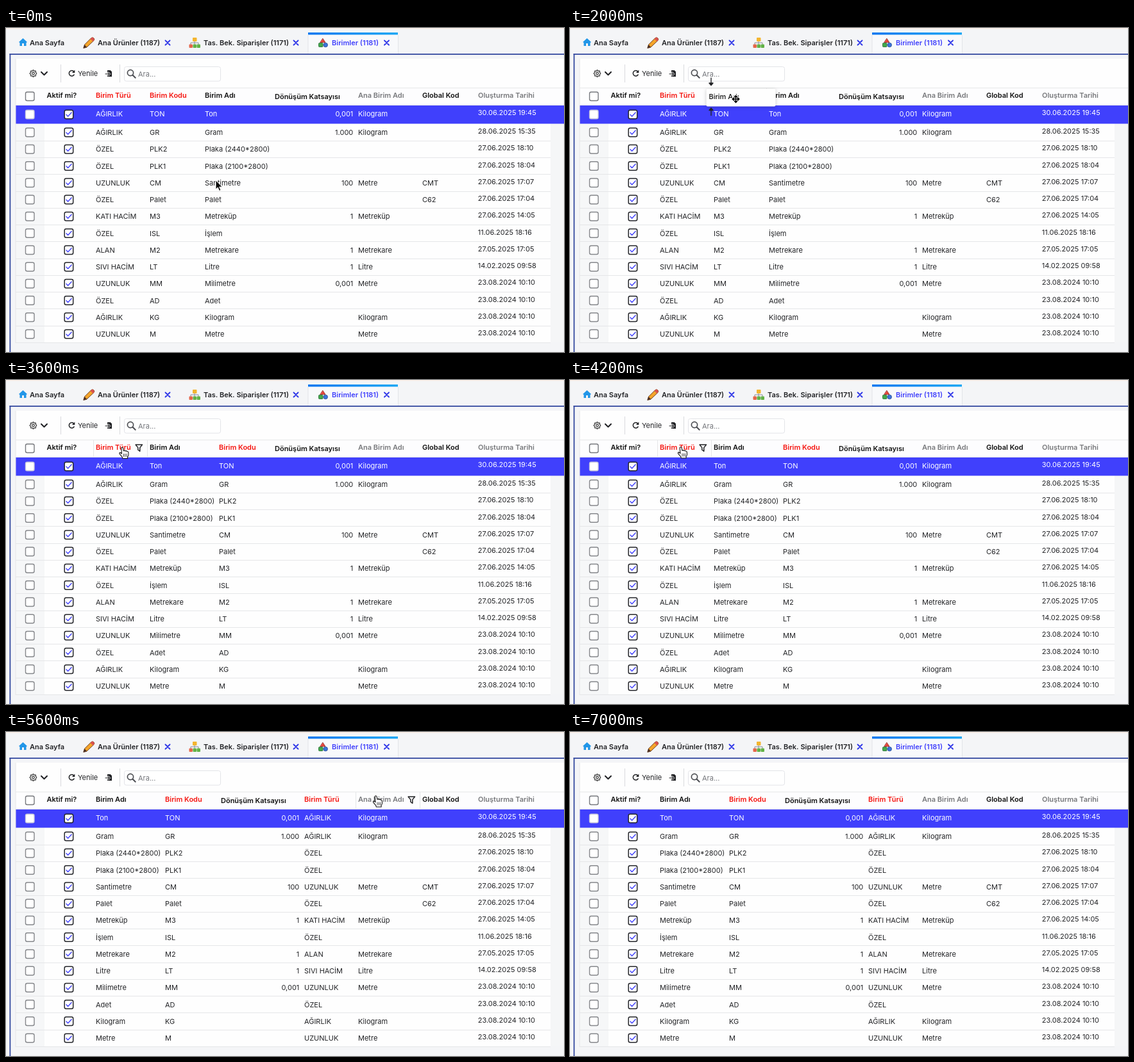
Recreate the animation shown at these times as an HTML page with a canvas. Size 870x506 px, loop 7.2 s.

```html
<!DOCTYPE html>
<html lang="tr">
<head>
<meta charset="utf-8">
<title>Birimler</title>
<style>
html, body { margin: 0; width: 100%; height: 100%; overflow: hidden; background: #f4f5f7; }
canvas { display: block; width: 870px; height: 506px; }
</style>
</head>
<body>
<canvas id="stage"></canvas>
<script>
const W = 870, H = 506, LOOP = 7200, STEP = 200;
const BLUE = '#4040fc', INK = '#222326', RED = '#f5140f', GREY = '#77787b', LINE = '#e5e6e8';
const HEAD_TOP = 94, HEAD_END = 121, BODY_END = 491;

const canvas = document.getElementById('stage');
const dpr = window.devicePixelRatio || 1;
canvas.width = W * dpr;
canvas.height = H * dpr;
const c = canvas.getContext('2d');

// type | code | name | factor | base unit | global code | created
const rows = `AĞIRLIK|TON|Ton|0,001|Kilogram||30.06.2025 19:45
AĞIRLIK|GR|Gram|1.000|Kilogram||28.06.2025 15:35
ÖZEL|PLK2|Plaka (2440*2800)||||27.06.2025 18:10
ÖZEL|PLK1|Plaka (2100*2800)||||27.06.2025 18:04
UZUNLUK|CM|Santimetre|100|Metre|CMT|27.06.2025 17:07
ÖZEL|Palet|Palet|||C62|27.06.2025 17:04
KATI HACİM|M3|Metreküp|1|Metreküp||27.06.2025 14:05
ÖZEL|ISL|İşlem||||11.06.2025 18:16
ALAN|M2|Metrekare|1|Metrekare||27.05.2025 17:05
SIVI HACİM|LT|Litre|1|Litre||14.02.2025 09:58
UZUNLUK|MM|Milimetre|0,001|Metre||23.08.2024 10:10
ÖZEL|AD|Adet||||23.08.2024 10:10
AĞIRLIK|KG|Kilogram||Kilogram||23.08.2024 10:10
UZUNLUK|M|Metre||Metre||23.08.2024 10:10`.split('\n').map(r => r.split('|'));

const cols = [
  { title: 'Birim Türü', w: 84, color: RED },
  { title: 'Birim Kodu', w: 86, color: RED },
  { title: 'Birim Adı', w: 108 },
  { title: 'Dönüşüm Katsayısı', w: 131, right: true, pad: 5, drop: 2.5 },
  { title: 'Ana Birim Adı', w: 100, color: GREY },
  { title: 'Global Kod', w: 87 },
  { title: 'Oluşturma Tarihi', w: 116, color: GREY, lift: 2 }
];

const orders = [
  { from: 0, ids: [0, 1, 2, 3, 4, 5, 6] },
  { from: 2400, ids: [0, 2, 1, 3, 4, 5, 6] },
  { from: 5600, ids: [2, 1, 3, 0, 4, 5, 6] }
];

const drags = [
  { col: 2, from: 1400, to: 2400, dx: 46, dy: 16 },
  { col: 0, from: 4400, to: 5600, dx: 39, dy: 13 }
];

// pointer path: time, x, y
const path = [
  [0, 327, 238], [200, 327, 238], [1000, 352, 110], [1400, 352, 110],
  [2000, 258.5, 111], [2200, 250, 111], [2800, 242, 108], [3400, 190, 106],
  [3800, 173, 105], [4200, 173, 105], [4400, 176, 106], [5000, 577, 100],
  [5600, 577, 100], [6200, 576, 99.5], [6400, 576, 99.5], [6800, 620, 540], [7200, 620, 540]
];

function pointerAt(t) {
  const i = path.findIndex(p => p[0] > t);
  const a = path[i - 1], b = path[i];
  let k = (t - a[0]) / (b[0] - a[0]);
  k = k * k * (3 - 2 * k);
  return { x: a[1] + (b[1] - a[1]) * k, y: a[2] + (b[2] - a[2]) * k };
}

function rect(x, y, w, h, color) {
  c.fillStyle = color;
  c.fillRect(x, y, w, h);
}

function box(x, y, w, h, r, fill, stroke, lw = 1) {
  c.beginPath();
  c.roundRect(x, y, w, h, r);
  if (fill) { c.fillStyle = fill; c.fill(); }
  if (stroke) { c.strokeStyle = stroke; c.lineWidth = lw; c.stroke(); }
}

// y is the middle of the capitals
function text(s, x, y, color = INK, weight = 400, align = 'left') {
  c.font = `${weight} 11px Inter, sans-serif`;
  c.textAlign = align;
  c.fillStyle = color;
  c.fillText(s, x, y + 4);
}

function shape(d, x, y, fill, stroke, lw = 1) {
  c.save();
  c.translate(x, y);
  c.lineJoin = c.lineCap = 'round';
  const p = new Path2D(d);
  if (fill) { c.fillStyle = fill; c.fill(p); }
  if (stroke) { c.strokeStyle = stroke; c.lineWidth = lw; c.stroke(p); }
  c.restore();
}

function disc(x, y, r, fill, stroke, lw) {
  c.beginPath();
  c.arc(x, y, r, 0, 7);
  if (fill) { c.fillStyle = fill; c.fill(); }
  if (stroke) { c.strokeStyle = stroke; c.lineWidth = lw; c.stroke(); }
}

function closeMark(x) {
  shape('M-3.5-3.5L3.5 3.5M3.5-3.5L-3.5 3.5', x, 23, null, '#3038e8', 1.9);
}

function drawTabs() {
  rect(0, 0, W, 1.5, '#fcefe8');
  shape('M-6.5 0L0-6L6.5 0L5 1V6H1.5V2H-1.5V6H-5V1Z', 26.5, 22, '#2196e8');
  text('Ana Sayfa', 37, 23, INK, 600);

  shape('M-8 8L-6.5 3L4-7.5Q6-9 8-7Q9.5-5 8-3.5L-3 7Z', 129, 23, '#f5a52a', '#6b3d20', 1);
  shape('M4-7.5Q6-9 8-7Q9.5-5 8-3.5L6.5-2L2.5-6Z', 129, 23, '#d9534f');
  shape('M-8.5 8.5L-6.5 3L-3 7Z', 129, 23, '#4a3024');
  text('Ana Ürünler (1187)', 143, 23, INK, 600);
  closeMark(252);

  shape('M0-4V4M-6 4V0H6V4', 294, 23, null, '#8b8f96', 1);
  box(291, 15, 6.5, 6, 1, '#f3b52f');
  box(285.5, 25.5, 5.5, 5.5, 1, '#e5674b');
  box(291.5, 25.5, 5.5, 5.5, 1, '#62b246');
  box(297.5, 25.5, 5.5, 5.5, 1, '#62b246');
  text('Tas. Bek. Siparişler (1171)', 308, 23, INK, 600);
  closeMark(452);

  rect(471, 8, 140, 33, '#f8f9fb');
  rect(470.5, 11, 1, 29, '#e2e4e8');
  rect(611, 11, 1, 29, '#e2e4e8');
  const g = c.createLinearGradient(471, 0, 611, 0);
  g.addColorStop(0, '#0a78f0');
  g.addColorStop(1, '#20a8f4');
  rect(471, 7, 140, 3.5, g);
  shape('M0-6L4 0H-4Z', 494, 22.5, '#e8473c', '#8e2a28', 0.8);
  box(487.5, 23.5, 6.5, 6, 1, '#42a84b', '#256d35', 0.8);
  disc(498.2, 26.5, 3.3, '#3b74d8', '#294b92', 0.8);
  text('Birimler (1181)', 508, 23, BLUE, 600);
  closeMark(593.5);
}

function drawGear(x, y) {
  c.save();
  c.translate(x, y);
  c.beginPath();
  for (let i = 0; i <= 48; i++) {
    const a = i / 48 * Math.PI * 2;
    const r = 4.7 + 0.7 * Math.cos(a * 8);
    c.lineTo(r * Math.cos(a), r * Math.sin(a));
  }
  c.strokeStyle = '#333';
  c.lineWidth = 1.2;
  c.stroke();
  disc(0, 0, 1.8, null, '#333', 1.2);
  c.restore();
}

function drawToolbar() {
  rect(15, 48, W - 15, 46, '#fefefe');
  drawGear(42.5, 71);
  shape('M-4.5-2.3L0 2.3L4.5-2.3', 59.5, 71, null, INK, 2);
  rect(85, 57, 1, 28, '#d9dadd');
  shape('M3.6 2A4.2 4.2 0 1 1 3-3.2', 102.5, 71, null, INK, 1.5);
  shape('M4.8-5.5V-1H.4Z', 102.5, 71, INK);
  text('Yenile', 112, 71);
  shape('M-2.5-5H2.2L4.5-2.7V5H-2.5Z', 160.5, 71, INK);
  shape('M-5 .8H1M-1-1.4L1.2.8L-1 3', 160.5, 71, null, '#fff', 2.4);
  shape('M-5.5 .8H1M-1-1.4L1.2.8L-1 3', 160.5, 71, null, INK, 1.1);
  rect(177, 57, 1, 28, '#d9dadd');
  box(184.5, 60.5, 150, 22.5, 3, '#fff', '#e3e4e8');
  disc(194, 70, 4.6, null, '#4b4d52', 1.7);
  shape('M0 0L4.2 4.2', 197.5, 73.5, null, '#4b4d52', 2);
  text('Ara...', 206, 71.5, '#74767b');
}

function layout(t) {
  let x = 136;
  const order = orders.filter(o => o.from <= t).pop();
  return order.ids.map(id => {
    const item = { id, x, w: cols[id].w };
    x += item.w;
    return item;
  });
}

function drawFilter(x, y) {
  shape('M-5.2-5H5.2L1.5-.4V5.3L-1.5 3V-.4Z', x, y, null, INK, 1.5);
}

function drawHeader(places, hover) {
  rect(15, HEAD_TOP, W - 15, 27, '#fdfdfe');
  rect(15, 93.2, W - 15, 1, LINE);
  rect(15, 120.2, W - 15, 1, LINE);
  box(30.5, 100, 13.5, 13.5, 2.5, '#fff', '#77797e', 1.4);
  text('Aktif mi?', 63.5, 104.5, '#111', 600);
  for (const p of places) {
    const col = cols[p.id];
    text(col.title, p.x + (col.pad || 4), 104.5 + (col.drop || 0), col.color || '#111', 600);
  }
  if (hover) {
    rect(hover.x, HEAD_TOP, 1, 26, LINE);
    rect(hover.x + hover.w, HEAD_TOP, 1, 26, LINE);
    drawFilter(hover.x + hover.w - 12.7, 106);
  }
}

function drawRows(places) {
  rect(15, HEAD_END, 834, BODY_END - HEAD_END, '#fefefe');
  rect(15, HEAD_END, 45, BODY_END - HEAD_END, '#f6f7f8');
  rect(849, HEAD_END, W - 849, BODY_END - HEAD_END, '#f5f6f7');
  rect(15, HEAD_END, W - 15, 28.5, BLUE);
  rows.forEach((row, i) => {
    const y = i ? 163 + (i - 1) * 26.25 : 134;
    const boxY = i ? y : 135;
    const ink = i ? INK : '#fff';
    if (i) rect(15, Math.round(y + 12.8), 834, 1, LINE);
    box(30.5, boxY - 6.8, 13.5, 13.5, 2.5, '#fff', i ? '#85878b' : '#c9c9dd', 1.4);
    box(91.2, boxY - 6.8, 13.5, 13.5, 2.5, '#fff', '#25262b', 1.5);
    shape('M-4 .2L-1.4 2.9L4.2-3', 98, boxY, null, BLUE, 1.4);
    for (const p of places) {
      const col = cols[p.id];
      const x = col.right ? p.x + p.w - 3.7 : p.x + (p.id === 6 ? 3.7 : 4);
      text(row[p.id], x, y - (col.lift || 0), ink, 400, col.right ? 'right' : 'left');
    }
  });
}

function drawDrag(drag, places, hover, at) {
  const own = places.findIndex(p => p.id === drag.col);
  const over = places.indexOf(hover);
  if (hover && over !== own) {
    const slot = at.x < hover.x + hover.w / 2 ? over : over + 1;
    if (slot !== own && slot !== own + 1) {
      const x = slot === over ? hover.x : hover.x + hover.w;
      shape('M0-6V5M-3 2L0 5.5L3 2Z', x, 84, INK, INK, 1.4);
      shape('M0 6V-5M-3-2L0-5.5L3-2Z', x, 130.5, INK, INK, 1.4);
    }
  }
  const col = cols[drag.col];
  const x = at.x - drag.dx, y = at.y - drag.dy;
  c.save();
  c.shadowColor = 'rgba(0,0,0,.22)';
  c.shadowBlur = 5 * dpr;
  c.shadowOffsetY = dpr;
  box(x, y, col.w, 27.5, 2, '#fefefe');
  c.restore();
  text(col.title, x + 4, y + 12.2, col.color || '#111', 500);
}

function drawPointer(kind, { x, y }) {
  if (kind === 'arrow') {
    shape('M0 0V14L3.2 11L5.6 16.4L8 15.3L5.6 10.2H10Z', x, y, '#080808', '#fff', 1);
  } else if (kind === 'hand') {
    shape('M-1.8 1Q-1.7-.5-.2-.3Q1.1 0 1.2 1.4L1.8 5.2Q3.5 4 4.6 5.4Q6.2 4.6 7.1 6Q9-.2 9.3 7.4L9.5 11Q9.4 13 8.1 14.4V17H.2L-.2 14.8L-4.4 9.8Q-5 8.2-3.6 7.9Q-2.5 7.9-1 9.6Z'
      .replace('Q9-.2 9.3 7.4', 'Q9 5.7 9.3 7.4'), x, y, '#fff', '#151515', 1.1);
    shape('M2 10V14M4.3 10V14M6.6 10V14', x, y, null, '#151515', 0.8);
  } else {
    const cross = 'M-5 0H5M0-5V5M-3.2-2L-5.4 0L-3.2 2ZM3.2-2L5.4 0L3.2 2ZM-2-3.2L0-5.4L2-3.2ZM-2 3.2L0 5.4L2 3.2Z';
    shape(cross, x, y, null, '#fff', 3.6);
    shape(cross, x, y, '#080808', '#080808', 1.5);
  }
}

function draw(time) {
  const t = Math.floor(time % LOOP / STEP) * STEP;
  const at = pointerAt(t);
  const places = layout(t);
  const drag = drags.find(d => t >= d.from && t < d.to);
  const inHead = at.y >= HEAD_TOP && at.y < HEAD_END;
  const hover = inHead ? places.find(p => at.x >= p.x && at.x < p.x + p.w) : null;

  c.setTransform(dpr, 0, 0, dpr, 0, 0);
  rect(0, 0, W, H, '#f4f5f7');
  drawTabs();
  rect(5.5, 40, W, 1.8, '#3449a0');
  rect(5.5, 40, 1.8, H, '#3449a0');
  drawToolbar();
  drawHeader(places, hover);
  drawRows(places);
  rect(14.5, 48, 1, BODY_END - 47, LINE);
  if (drag) drawDrag(drag, places, hover, at);
  drawPointer(drag ? 'move' : hover ? 'hand' : 'arrow', at);
}

const start = performance.now();
function tick() {
  draw(performance.now() - start);
  requestAnimationFrame(tick);
}
tick();
</script>
</body>
</html>
```
